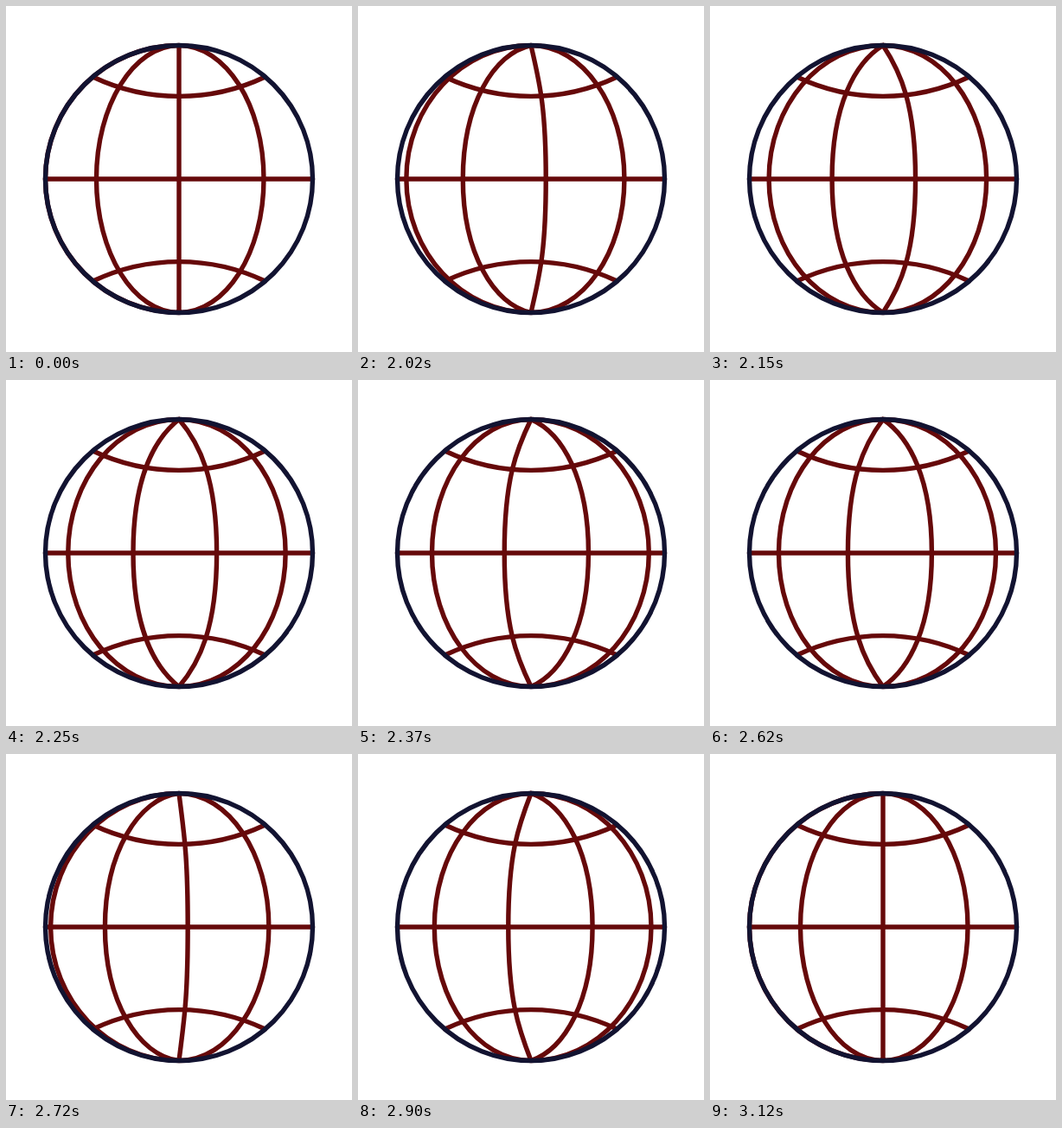
An HTML page for the animation above (3.2 s loop, 400 px wide and 400 px high).

```html
<!DOCTYPE html>
<html lang="en">
<head>
<meta charset="utf-8">
<title>Spinning globe</title>
<style>
  html, body { margin: 0; width: 100%; height: 100%; overflow: hidden; background: #fff; }
  svg { display: block; width: 100vw; height: 100vh; }
</style>
</head>
<body>
<svg viewBox="-200 -200 400 400" fill="none" stroke="#66090a" stroke-width="5.4" stroke-linecap="round" stroke-linejoin="round">
  <path d="M-154.5 0H154.5M-99.5 -118A232 232 0 0 0 99.5 -118M-99.5 118A232 232 0 0 1 99.5 118"/>
  <path id="meridians"/>
  <circle r="154.5" stroke="#121331"/>
</svg>
<script>
const LOOP = 3200, START = 2000, SPIN = 1125, STEP = 25;
const TURNS = 7;            // stops each meridian slot passes during one spin
const R = 154.5, K = 0.5523;
const STOPS = [-R, -95.5, 0, 98, R];
const meridians = document.getElementById('meridians');

const cubic = (t, a, b) => 3 * (1 - t) ** 2 * t * a + 3 * (1 - t) * t * t * b + t ** 3;

function ease(x) {
  if (x <= 0) return 0;
  if (x >= 1) return 1;
  let lo = 0, hi = 1;
  for (let i = 0; i < 30; i++) {
    const mid = (lo + hi) / 2;
    if (cubic(mid, 0.167, 0.457) < x) lo = mid; else hi = mid;
  }
  return cubic(lo, 0.167, 1);
}

// Half ellipse from pole to pole; its pole handles shorten as it flattens.
function meridian(x) {
  const pole = R * (2 + Math.min(1, Math.abs(x) / 96)) / 3;
  const cx = K * x, cy = K * R;
  return `M0 ${-R}C${cx} ${-pole} ${x} ${-cy} ${x} 0C${x} ${cy} ${cx} ${pole} 0 ${R}`;
}

function draw(ms) {
  const time = Math.floor((ms % LOOP + 5) / STEP) * STEP;
  const shift = TURNS * ease((time - START) / SPIN) % 1;
  meridians.setAttribute('d', STOPS.slice(0, -1)
    .map((x, i) => meridian(x + (STOPS[i + 1] - x) * shift))
    .join(''));
}

const begin = performance.now();
function tick() {
  draw(performance.now() - begin);
  requestAnimationFrame(tick);
}
tick();
</script>
</body>
</html>
```
